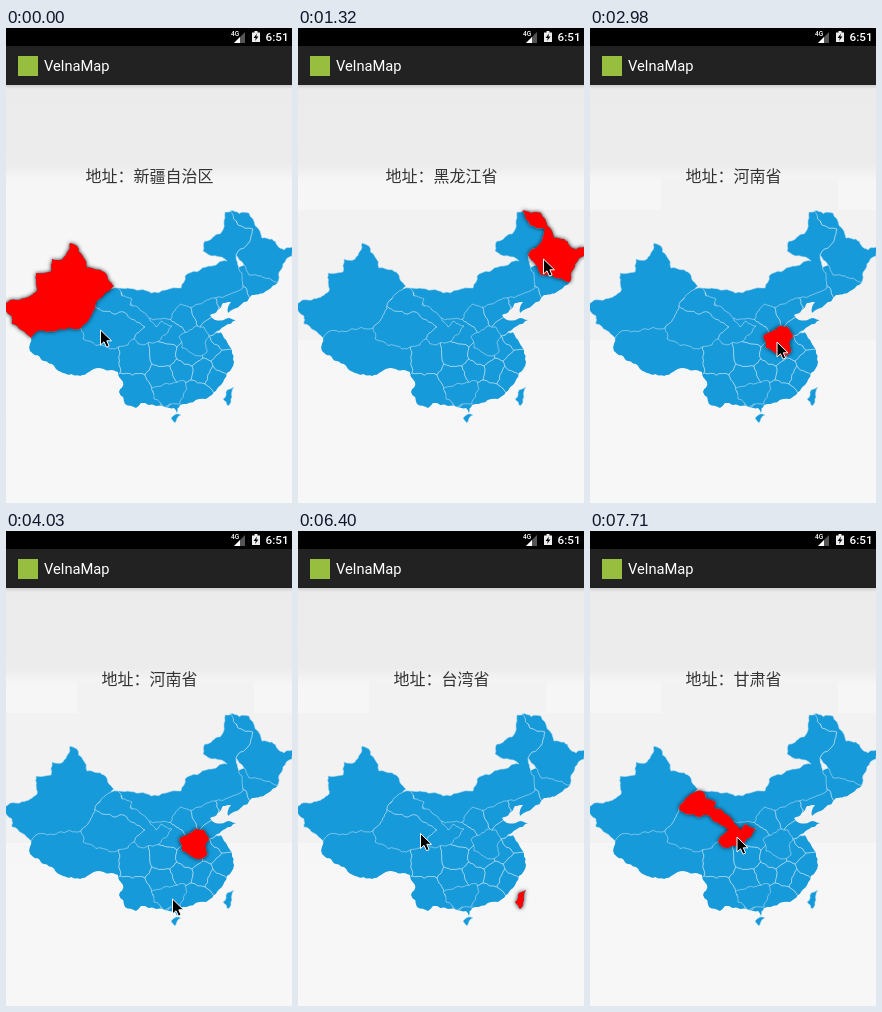
Animation of 286 by 475 pixels, one loop 8000 ms. Source, as an HTML page:

```html
<!DOCTYPE html>
<html lang="zh-CN">
<head>
<meta charset="utf-8">
<style>
html, body { margin: 0; width: 100%; height: 100%; overflow: hidden; background: #f7f7f7; }
svg { display: block; position: absolute; left: 0; top: 0; width: 286px; height: 475px; }
.ui { font-family: Roboto, sans-serif; fill: #fff; }
#label { font: 16px "Noto Sans CJK SC", "Noto Sans CJK", sans-serif; fill: #333; text-anchor: middle; }
.land path { fill: #179ad9; stroke: #b9ddf1; stroke-width: .6; stroke-linejoin: round; }
#pick { fill: #f00; filter: drop-shadow(0 0 2px rgba(0, 0, 0, .9)); }
</style>
</head>
<body>
<svg viewBox="0 0 286 475">
  <defs>
    <linearGradient id="sky" x1="0" y1="57" x2="0" y2="475" gradientUnits="userSpaceOnUse">
      <stop offset="0" stop-color="#ebebeb"/><stop offset=".19" stop-color="#ececec"/>
      <stop offset=".23" stop-color="#f6f6f6"/><stop offset="1" stop-color="#f7f7f7"/>
    </linearGradient>
    <linearGradient id="fade" x1="0" y1="0" x2="0" y2="1">
      <stop offset="0" stop-opacity=".12"/><stop offset="1" stop-opacity="0"/>
    </linearGradient>
    <clipPath id="inland"><path id="coast"/></clipPath>
  </defs>
  <rect y="57" width="286" height="418" fill="url(#sky)"/>
  <rect class="tint" data-at="840" y="182" width="286" height="130" fill="#f2f2f2"/>
  <rect class="tint" data-at="2980" x="71" y="150" width="177" height="162" fill="#f2f2f2"/>
  <rect y="57" width="286" height="4" fill="url(#fade)"/>
  <rect width="286" height="18"/>
  <rect y="18" width="286" height="39" fill="#222"/>
  <rect x="12" y="28" width="20" height="20" fill="#97be3f"/>
  <text class="ui" x="38" y="43" font-size="14.7">VelnaMap</text>
  <text class="ui" x="225" y="8" font-size="6.5" font-weight="500">4G</text>
  <path d="M239 4V15H228Z" fill="#555"/>
  <path d="M234 9V15H228Z" fill="#fff"/>
  <path d="M246 4.5H248.5V3H251.5V4.5H254V14H246Z" fill="#eee"/>
  <path d="M251 5.5L247.6 10H249.8L249 13L252.5 8.6H250.3Z"/>
  <text class="ui" x="259.5" y="13.4" font-size="11.7" font-weight="500">6:51</text>
  <text id="label" x="143.5" y="154"></text>
  <g class="land" id="cells" clip-path="url(#inland)"></g>
  <g class="land" id="regions"></g>
  <path id="pick"/>
  <path id="cursor" d="M0 0V15L3.5 11.8L6 17.2L8.6 16L6.3 10.8H11Z" stroke="#fff" stroke-linejoin="round"/>
</svg>
<script>
const LOOP = 8000, LABEL_LEAD = 30;
const $ = id => document.getElementById(id);
const points = text => text.split(/\s+/).map(p => p.split(",").map(Number));

// Key points only; rough() adds the ragged detail.
const coast = `25,309 24,323 38,333 57,345 74,348 93,340 112,344 117,354 113,364 119,376 130,380 135,375
  150,378 168,380 171,385 174,377 200,371 215,357 228,334 226,322 213,303 219,298 230,292 209,292 204,287
  217,275 225,274 222,285 246,267 262,262 272,254 255,235 228,240 200,250 150,275 107,270 40,290`;

const regions = {
  neimenggu: `219,184 226,183 232,197 247,201 240,218 230,227 236,245 237,260 209,270 187,279 175,276 165,291
    147,292 130,282 116,268 111,260 145,265 175,260 179,248 203,238 221,233 197,223 199,213 214,206`,
  heilongjiang: `224,183 243,185 256,210 266,211 278,222 286,219 286,228 277,236 272,254 255,248 243,247
    230,227 240,218 247,201 232,197`,
  xinjiang: `0,275 31,263 30,245 45,244 46,231 57,231 64,215 71,218 81,240 98,244 108,258 91,273 89,278
    82,293 75,300 30,304 25,310 6,296 6,288 0,283`,
  qinghai: "75,300 82,293 89,278 109,286 118,284 139,299 128,311 122,317 104,321 77,311",
  gansu: `89,278 91,273 105,261 112,260 116,268 126,271 124,277 140,286 150,299 156,293 166,298 155,311
    140,316 132,316 128,311 139,299 118,284 109,286`,
  henan: "173,309 190,298 198,299 203,309 199,315 201,324 195,328 176,320",
  guangxi: "145,361 158,356 179,353 181,361 174,376 158,379 148,371",
  taiwan: "217,371 221,362 228,359 226,369 222,378",
  hainan: "165,390 170,386 175,387 169,395"
};

// Centres of the other provinces; each one owns the land nearest to it.
const centres = points(`95,330 132,330 130,362 157,348 159,327 176,342 183,328 196,344 191,365 210,350
  218,332 206,320 215,312 207,296 196,286 181,293 166,306 228,268 252,256`);

// Midpoint displacement, seeded by the edge itself so that neighbours share their border.
function bend(a, b) {
  const len = Math.hypot(b[0] - a[0], b[1] - a[1]);
  if (len < 4) return [a];
  if (a[0] > b[0] || (a[0] === b[0] && a[1] > b[1])) return [...bend(b, a).slice(1).reverse().reduce((r, p) => [...r, p], [a])];
  const seed = Math.sin(a[0] * 12.9 + a[1] * 78.2 + b[0] * 37.7 + b[1] * 4.1);
  const k = seed * Math.min(.13, 1.6 / len);
  const mid = [(a[0] + b[0]) / 2 - (b[1] - a[1]) * k, (a[1] + b[1]) / 2 + (b[0] - a[0]) * k];
  return [...bend(a, mid), ...bend(mid, b)];
}

function rough(pts) {
  const line = pts.flatMap((p, i) => bend(p, pts[(i + 1) % pts.length]));
  return "M" + line.map(p => p.map(v => v.toFixed(1)).join()).join("L") + "Z";
}

// Keeps the part of a polygon that is nearer to c than to d.
function nearer(poly, c, d) {
  const side = p => Math.hypot(p[0] - d[0], p[1] - d[1]) ** 2 - Math.hypot(p[0] - c[0], p[1] - c[1]) ** 2;
  return poly.flatMap((p, i) => {
    const q = poly[(i + 1) % poly.length], s = side(p), e = side(q);
    const kept = s >= 0 ? [p] : [];
    if (s * e < 0) kept.push(p.map((v, j) => v + (q[j] - v) * s / (s - e)));
    return kept;
  });
}

function cell(c) {
  const box = points("0,170 286,170 286,400 0,400");
  return centres.filter(d => d !== c).reduce((poly, d) => nearer(poly, c, d), box)
    .map(p => p.map(Math.round));
}

function addPath(group, d) {
  const path = document.createElementNS("http://www.w3.org/2000/svg", "path");
  path.setAttribute("d", d);
  $(group).append(path);
}

const shapes = {};
$("coast").setAttribute("d", rough(points(coast)));
for (const c of centres) addPath("cells", rough(cell(c)));
for (const name in regions) addPath("regions", shapes[name] = rough(points(regions[name])));

const picks = [
  [0, "新疆自治区", "xinjiang"],
  [840, "黑龙江省", "heilongjiang"],
  [1960, "内蒙古自治区", "neimenggu"],
  [2980, "河南省", "henan"],
  [4120, "广西壮族自治区", "guangxi"],
  [5430, "台湾省", "taiwan"],
  [6650, "青海省", "qinghai"],
  [7710, "甘肃省", "gansu"]
];

// start, end, control point, end point
const home = [94.5, 302];
const legs = [
  [30, 780, [140, 324], [245.5, 231]],
  [1320, 1930, [225, 248], [198.5, 251]],
  [2440, 2920, [190, 330], [187, 314]],
  [3400, 3830, [194, 345], [166.5, 368]],
  [4690, 4940, [190, 368], [219.5, 370]],
  [5910, 6400, [170, 330], [122.5, 302.5]],
  [7130, 7660, [134, 328], [147, 306]]
];

function cursorAt(t) {
  let from = home;
  for (const [t0, t1, mid, to] of legs) {
    if (t < t0) break;
    if (t < t1) {
      const k = (t - t0) / (t1 - t0), u = k * k * (3 - 2 * k), v = 1 - u;
      return from.map((p, i) => v * v * p + 2 * u * v * mid[i] + u * u * to[i]);
    }
    from = to;
  }
  return from;
}

const tints = document.querySelectorAll(".tint");
const pickAt = t => picks.filter(p => p[0] <= t).pop();
const start = performance.now();

function draw() {
  const t = (performance.now() - start) % LOOP;
  $("label").textContent = "地址：" + pickAt(t + LABEL_LEAD)[1];
  $("pick").setAttribute("d", shapes[pickAt(t)[2]]);
  $("cursor").setAttribute("transform", `translate(${cursorAt(t)})`);
  tints.forEach(r => r.style.display = t < r.dataset.at ? "none" : "");
  requestAnimationFrame(draw);
}
draw();
</script>
</body>
</html>
```
